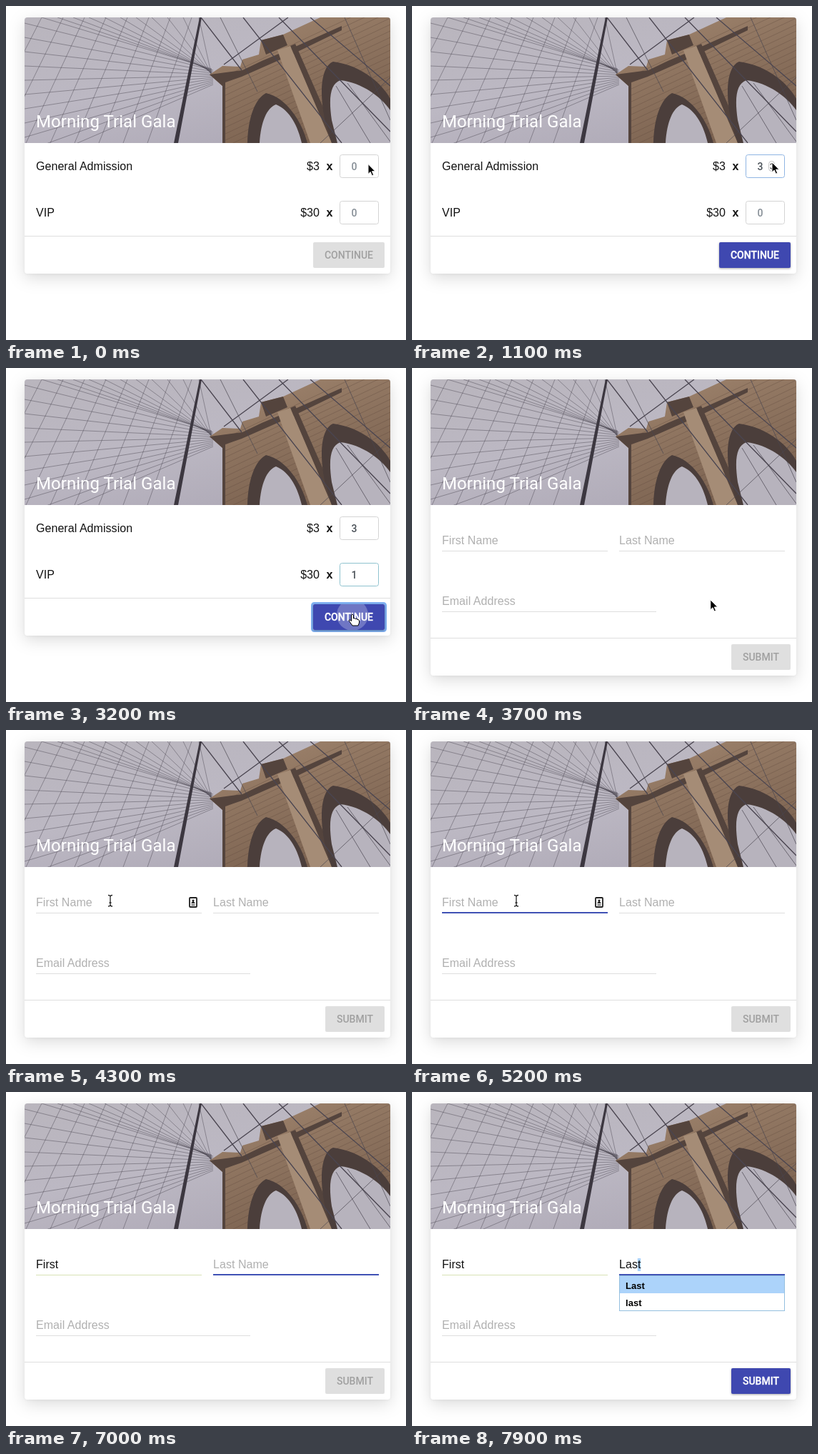
These frames come from a looping animation (560x468 px, 8 s). An HTML page:

```html
<!DOCTYPE html>
<html lang="en">
<head>
<meta charset="utf-8">
<title>Ticket form</title>
<style>
html, body { margin: 0; width: 100%; height: 100%; overflow: hidden; background: #fff; }
#stage { display: block; width: 560px; height: 468px; font: 16px "Liberation Sans", Arial, sans-serif; letter-spacing: .05px; fill: #111; }
#card { fill: #fff; filter: drop-shadow(0 1px 2px rgba(0,0,0,.05)) drop-shadow(0 6px 11px rgba(0,0,0,.14)); }
.title { font: 24px Roboto, sans-serif; fill: #fff; }
.times { font-weight: bold; }
.btn { font: 500 14px Roboto, sans-serif; letter-spacing: 0; fill: #a0a0a0; }
.btn rect { fill: #dfdfdf; }
.btn.on { fill: #fff; stroke: #fff; stroke-width: .3; }
.btn.on rect { fill: #3f48b0; stroke: none; filter: drop-shadow(0 1.5px 1.5px rgba(0,0,0,.35)); }
.num { font: 500 14px Roboto, sans-serif; fill: #495057; }
.num.empty { fill: #868e96; }
.box { fill: #fff; stroke: #d4d4d4; }
.line { fill: #dedede; }
.bar { fill: #3f51b5; }
.hint { fill: #b0b0b0; }
.sel { fill: #acd3fa; }
.menu { font-size: 13px; font-weight: bold; fill: #000; }
.menu .frame { fill: #fff; stroke: #94bfdf; }
.spin { fill: #fff; stroke: #c4c4c4; }
.spin path { fill: none; stroke: #444; stroke-width: 1.2; }
.cable { fill: none; stroke: #4a4550; }
</style>
</head>
<body>
<svg id="stage" viewBox="0 0 560 468">
  <defs>
    <linearGradient id="sky" x2=".6" y2="1">
      <stop offset="0" stop-color="#b9b5bd"/>
      <stop offset=".55" stop-color="#bcb8c3"/>
      <stop offset="1" stop-color="#b0abb8"/>
    </linearGradient>
    <linearGradient id="stone" x2=".5" y2="1">
      <stop offset="0" stop-color="#a1866f"/>
      <stop offset="1" stop-color="#7b6250"/>
    </linearGradient>
    <clipPath id="photoClip"><path d="M26 192V20a4 4 0 0 1 4-4H534a4 4 0 0 1 4 4V192Z"/></clipPath>
    <clipPath id="btnClip"><rect x="430" y="331" width="100" height="36" rx="2"/></clipPath>
  </defs>

  <rect id="card" x="26" y="16" width="512" height="359" rx="4"/>

  <g clip-path="url(#photoClip)">
    <rect x="26" y="16" width="512" height="176" fill="url(#sky)"/>
    <path id="web" class="cable" stroke-width=".7" opacity=".65"/>
    <path fill="#3c3740" d="M271 16H274L241 192H235Z"/>
    <path fill="url(#stone)" d="M285 96L303 84 328 85 331 75 354 68 357 48 388 40 440 16H538V192H303V112Z"/>
    <path id="bricks" fill="none" stroke="#5c473d" stroke-width=".8" opacity=".45"/>
    <path fill="#54443d" d="M285 96L331 90 358 77 396 61 470 28V34L398 69 330 99 307 107V192H303V112ZM357 48L388 40 394 55 364 68ZM398 56L405 53 466 192H456Z"/>
    <path fill="#a58c76" d="M380 62L398 56 456 192H426Z"/>
    <path fill="#4b3e3b" d="M338 192C339 155 349 130 364 122C392 128 414 161 422 192ZM446 158C437 112 444 83 458 78C497 83 526 108 538 130V192H456Z"/>
    <path fill="#b7b3bd" d="M355 192C357 162 365 143 378 138C398 146 409 170 414 192ZM456 160C451 126 455 109 468 104C497 107 524 126 538 146V192H464Z"/>
    <path class="cable" stroke-width="1.3" d="M273 16L330 90M332 16L470 192M382 16L538 176M426 16L538 112M305 82L395 16"/>
    <path class="cable" stroke-width=".7" d="M300 16L352 120M440 192L538 100M474 16L538 160M462 112L510 192M478 108L538 190"/>
  </g>
  <text class="title" x="42" y="170">Morning Trial Gala</text>

  <g id="tickets">
    <text x="42" y="230">General Admission</text>
    <text x="439" y="230" text-anchor="end">$3</text>
    <text class="times" x="448.500" y="230">x</text>
    <text x="42" y="295">VIP</text>
    <text x="439" y="295" text-anchor="end">$30</text>
    <text class="times" x="448.500" y="295">x</text>
    <rect id="boxA" class="box" x="467.5" y="208.5" width="54" height="32" rx="3"/>
    <text id="numA" class="num" x="483.5" y="229.500"></text>
    <g id="spinA" class="spin"><rect x="499.5" y="217.5" width="8" height="14" rx="4"/><path d="M501.500 222.500l2-2 2 2M501.500 226.500l2 2 2-2"/></g>
    <rect id="boxB" class="box" x="467.5" y="273.5" width="54" height="32" rx="3"/>
    <text id="numB" class="num" x="483.5" y="294.500"></text>
    <g id="spinB" class="spin"><rect x="499.5" y="282.5" width="8" height="14" rx="4"/><path d="M501.500 287.500l2-2 2 2M501.500 291.500l2 2 2-2"/></g>
    <rect class="line" x="26" y="322" width="512" height="1"/>
    <rect id="ring" x="428.500" y="329.500" width="103" height="39" rx="3" fill="none" stroke="#7fb0f2" stroke-width="3"/>
    <g id="next" class="btn"><rect x="430" y="331" width="100" height="36" rx="2"/><text x="480" y="354" text-anchor="middle">CONTINUE</text></g>
    <circle id="ripple" cx="485" cy="346" fill="#fff" clip-path="url(#btnClip)"/>
  </g>

  <g id="form">
    <rect id="lineA" class="line" x="42" y="256" width="232" height="1"/>
    <rect class="line" x="290" y="256" width="232" height="1"/>
    <rect class="line" x="42" y="341" width="300" height="1"/>
    <rect class="line" x="26" y="378" width="512" height="1"/>
    <rect id="selA" class="sel" x="55.400" y="233" width="17.700" height="18"/>
    <rect id="selB" class="sel" x="315.800" y="233" width="4.400" height="18"/>
    <text id="first" x="42" y="247"></text>
    <text id="last" x="290" y="247"></text>
    <text class="hint" x="42" y="332">Email Address</text>
    <g id="icon">
      <rect x="257" y="235" width="10" height="13" rx="1" fill="#fff" stroke="currentColor" stroke-width="1.800"/>
      <path fill="currentColor" d="M260.500 239a1.500 1.500 0 0 1 3 0q0 1-.7 1.600l1.700 1.400v1h-5v-1l1.700-1.400q-.7-.6-.7-1.600ZM259.500 244.500h5v1.200h-5Z"/>
    </g>
    <g id="menuA" class="menu">
      <rect class="frame" x="42.500" y="257.500" width="231" height="49"/>
      <rect id="pickA" class="sel" x="43" y="258" width="230" height="24"/>
      <text x="51" y="276">First</text><text x="51" y="300">first</text>
    </g>
    <g id="menuB" class="menu">
      <rect class="frame" x="290.500" y="257.500" width="231" height="49"/>
      <rect id="pickB" class="sel" x="291" y="258" width="230" height="24"/>
      <text x="299" y="276">Last</text><text x="299" y="300">last</text>
    </g>
    <rect id="barA" class="bar" y="255" height="2"/>
    <rect id="barB" class="bar" y="255" height="2"/>
    <g id="send" class="btn"><rect x="447" y="387" width="83" height="36" rx="2"/><text x="488.500" y="410" text-anchor="middle">SUBMIT</text></g>
  </g>

  <g id="pointer" stroke-linejoin="round">
    <path id="arrow" stroke="#fff" fill="#000" d="M0 0V14L3.200 11 5.400 16.200 7.700 15.200 5.500 10.200H10Z"/>
    <path id="hand" stroke="#000" fill="#fff" d="M-1.500 0Q0-2 1.500 0V5Q3 4 4.200 5.500 6 4.800 7 6.500 9 6 9.500 8V11L8 15H0L-5 8Q-4.500 5.800-1.500 8.500Z"/>
    <path id="beam" stroke="#222" stroke-width="1.300" fill="none" d="M-3-7.500Q0-7.500 0-5.500Q0-7.500 3-7.500M0-6V7M-3 8Q0 8 0 6Q0 8 3 8M-1.500 3H1.500"/>
  </g>
</svg>
<script>
const LOOP = 8000, STEP = 100, SWITCH = 3500;
const el = id => document.getElementById(id);
const set = (id, attrs) => { for (const k in attrs) el(id).setAttribute(k, attrs[k]); };
const show = (id, on) => { el(id).style.display = on ? '' : 'none'; };
const clamp = v => Math.max(0, Math.min(1, v));
const ease = v => v * v * (3 - 2 * v);
// Latest value of a [time, value] list
const at = (list, t) => list.reduce((v, [start, next]) => t >= start ? next : v, '');

const path = [[0, 507, 221.5], [200, 507, 221.5], [500, 504, 219], [1300, 504, 219], [1900, 506, 289],
  [2200, 504, 285], [2500, 504, 285], [3000, 485, 346], [3500, 485, 346], [4200, 146, 239]];
const ticketsA = [[0, 0], [500, 1], [800, 2], [1100, 3]];
const ticketsB = [[0, 0], [2300, 1]];
const firstText = [[0, 'First Name'], [5300, 'F'], [6000, 'Fi'], [6300, 'First']];
const lastText = [[0, 'Last Name'], [7200, 'L'], [7400, 'La'], [7600, 'Las'], [7800, 'Last']];

// Cable fan towards the tower, hangers across it, and courses of stone
function drawPhotoLines() {
  let web = '', bricks = '';
  for (let i = 0; i < 11; i++) {
    web += `M26 ${24 + i * 20}L290 ${90 + i * 2}`;
    web += `M${50 + i * 22} 16L288 ${88 + i}`;
  }
  for (let i = 0; i < 8; i++) web += `M${50 + i * 30} 16L${i * 34 - 40} 192`;
  for (let i = 0; i < 25; i++) bricks += `M303 ${100 + i * 9}L538 ${i * 9 - 10}`;
  set('web', { d: web });
  set('bricks', { d: bricks });
}

function pointerAt(t) {
  const i = path.findIndex(p => p[0] > t);
  if (i < 0) return path[path.length - 1].slice(1);
  const [t0, x0, y0] = path[i - 1], [t1, x1, y1] = path[i];
  const k = ease((t - t0) / (t1 - t0));
  return [x0 + (x1 - x0) * k, y0 + (y1 - y0) * k];
}

function field(id, list, t) {
  el(id).textContent = at(list, t);
  el(id).setAttribute('class', t < list[1][0] ? 'hint' : '');
}

function count(id, list, t) {
  const n = at(list, t);
  el(id).textContent = n;
  el(id).classList.toggle('empty', !n);
}

function bar(id, left, k) {
  set(id, { x: left + 116 * (1 - k), width: 232 * k });
}

function render(t) {
  const form = t >= SWITCH;
  show('tickets', !form);
  show('form', form);
  set('card', { height: form ? 415 : 359 });

  count('numA', ticketsA, t);
  count('numB', ticketsB, t);
  show('spinA', t >= 100 && t < 2300);
  show('spinB', t >= 1800 && t < 2800);
  el('boxA').style.stroke = t >= 500 && t < 2300 ? '#8fb5e3' : '';
  el('boxB').style.stroke = t >= 2300 && t < 3400 ? '#8fc3cf' : '';
  el('next').classList.toggle('on', t >= 500);
  show('ring', t >= 3100);
  set('ripple', { r: t < 3100 ? 0 : (t - 3000) * .11, opacity: .25 * clamp((3600 - t) / 400) });

  field('first', firstText, t);
  field('last', lastText, t);
  bar('barA', 42, t < 6700 ? ease(clamp((t - 4500) / 200)) : 0);
  bar('barB', 290, ease(clamp((t - 6600) / 300)));
  el('lineA').style.fill = t >= 6700 ? '#d8e2b6' : '';
  show('icon', t >= 4000 && t < 6700);
  el('icon').style.color = t < 5300 ? '#222' : '#8a8a8a';
  show('menuA', t >= 5300 && t < 6500);
  show('pickA', t >= 6300);
  show('selA', t >= 6300 && t < 6500);
  show('menuB', t >= 7200);
  show('pickB', t >= 7800);
  show('selB', t >= 7800);
  el('send').classList.toggle('on', t >= 7200);

  const [x, y] = pointerAt(t);
  const hand = t >= 2900 && t < 3600, beam = t >= 4100;
  set('pointer', { transform: `translate(${x} ${y})` });
  show('pointer', t < 5300);
  show('hand', hand);
  show('beam', beam);
  show('arrow', !hand && !beam);
}

drawPhotoLines();
const start = performance.now();
function tick() {
  const t = (performance.now() - start) % LOOP;
  render(Math.floor(t / STEP) * STEP);
  requestAnimationFrame(tick);
}
tick();
</script>
</body>
</html>
```
